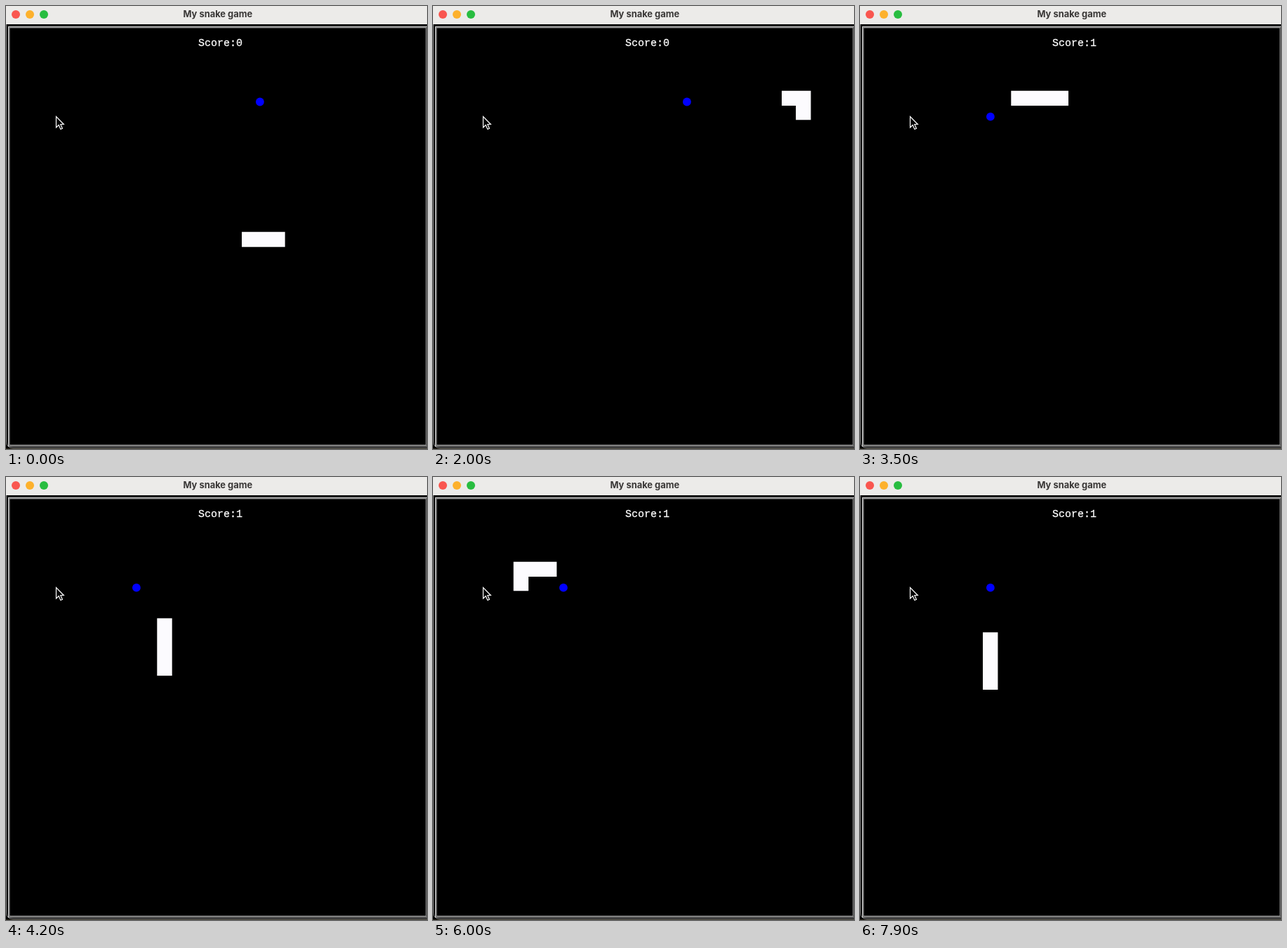
An HTML page for the animation above (8 s loop, 600 by 631 pixels).

```html
<!DOCTYPE html>
<html lang="en">
<head>
<meta charset="utf-8">
<title>My snake game</title>
<style>
  html, body { margin: 0; width: 100%; height: 100%; overflow: hidden; background: #000; }
  svg { display: block; width: 100%; height: 100%; }
  .title { font: 700 12.9px Inter, sans-serif; fill: #393736; text-anchor: middle; }
  .score { font: 15px "Courier New", "Liberation Mono", monospace; fill: #fff; stroke: #fff; stroke-width: .3; }
</style>
</head>
<body>
<svg viewBox="0 0 600 631">
  <rect width="600" height="631" fill="#000"/>
  <rect y="630" width="600" height="1" fill="#29251a"/>
  <path d="M.5 26V620Q.5 629.5 10 629.5H600" fill="none" stroke="#808080"/>
  <rect width="600" height="26" fill="#ecebe9"/>
  <circle cx="14" cy="12" r="6" fill="#f9564f"/>
  <circle cx="34" cy="12" r="6" fill="#fdb12c"/>
  <circle cx="54" cy="12" r="6" fill="#28bd40"/>
  <text class="title" x="301.8" y="16.3">My snake game</text>

  <g fill="none">
    <rect x="3.5" y="29.5" width="597.5" height="597.5" stroke="#d6d6d6"/>
    <rect x="4.8" y="30.8" width="594" height="594.7" stroke="#8a8a8a" stroke-width="1.4"/>
  </g>

  <text class="score" id="score" x="274" y="57">Score:0</text>
  <circle id="food" r="5.9" fill="#00f"/>
  <polyline id="snake" fill="none" stroke="#fcfbfe" stroke-width="21.4" stroke-linecap="square"/>
  <path d="M71.5 157.5V173l3.7-3.5 2.6 6 2.6-1.1-2.6-5.9h4.5z" fill="#000" stroke="#fff" stroke-width="1.2"/>
</svg>
<script>
  const LOOP = 8000, TICK = 100, CELL = 20.12;
  const PAUSES = [5, 14, 27, 44, 57, 70];
  const ROUTE = "R7 U10 L15 D8 L5 U8 R5 D9 L2 U4";
  const DIRS = { R: [1, 0], L: [-1, 0], U: [0, -1], D: [0, 1] };
  const EAT = 25;    // step on which the food is reached
  const START = 2;   // path index of the head at step 0

  const path = [[11, 10], [12, 10], [13, 10]];
  for (const leg of ROUTE.split(" ")) {
    const [dx, dy] = DIRS[leg[0]];
    for (let n = +leg.slice(1); n > 0; n--) {
      const [x, y] = path[path.length - 1];
      path.push([x + dx, y + dy]);
    }
  }

  const get = id => document.getElementById(id);
  const snake = get("snake"), food = get("food"), score = get("score");
  const place = ([x, y]) => `${125.4 + x * CELL},${131.35 + y * CELL}`;

  function draw(time) {
    const tick = Math.floor((time % LOOP) / TICK);
    const step = tick - PAUSES.filter(p => p <= tick).length;
    const head = step + START;
    const length = step > EAT ? 4 : 3;
    const eaten = step >= EAT;

    snake.setAttribute("points", path.slice(head - length + 1, head + 1).map(place).join(" "));
    food.setAttribute("cx", eaten ? 185.9 : 361.9);
    food.setAttribute("cy", eaten ? 157.7 : 136.5);
    score.textContent = "Score:" + (eaten ? 1 : 0);
  }

  const start = performance.now();
  function frame() {
    draw(performance.now() - start);
    requestAnimationFrame(frame);
  }
  draw(0);
  requestAnimationFrame(frame);
</script>
</body>
</html>
```
